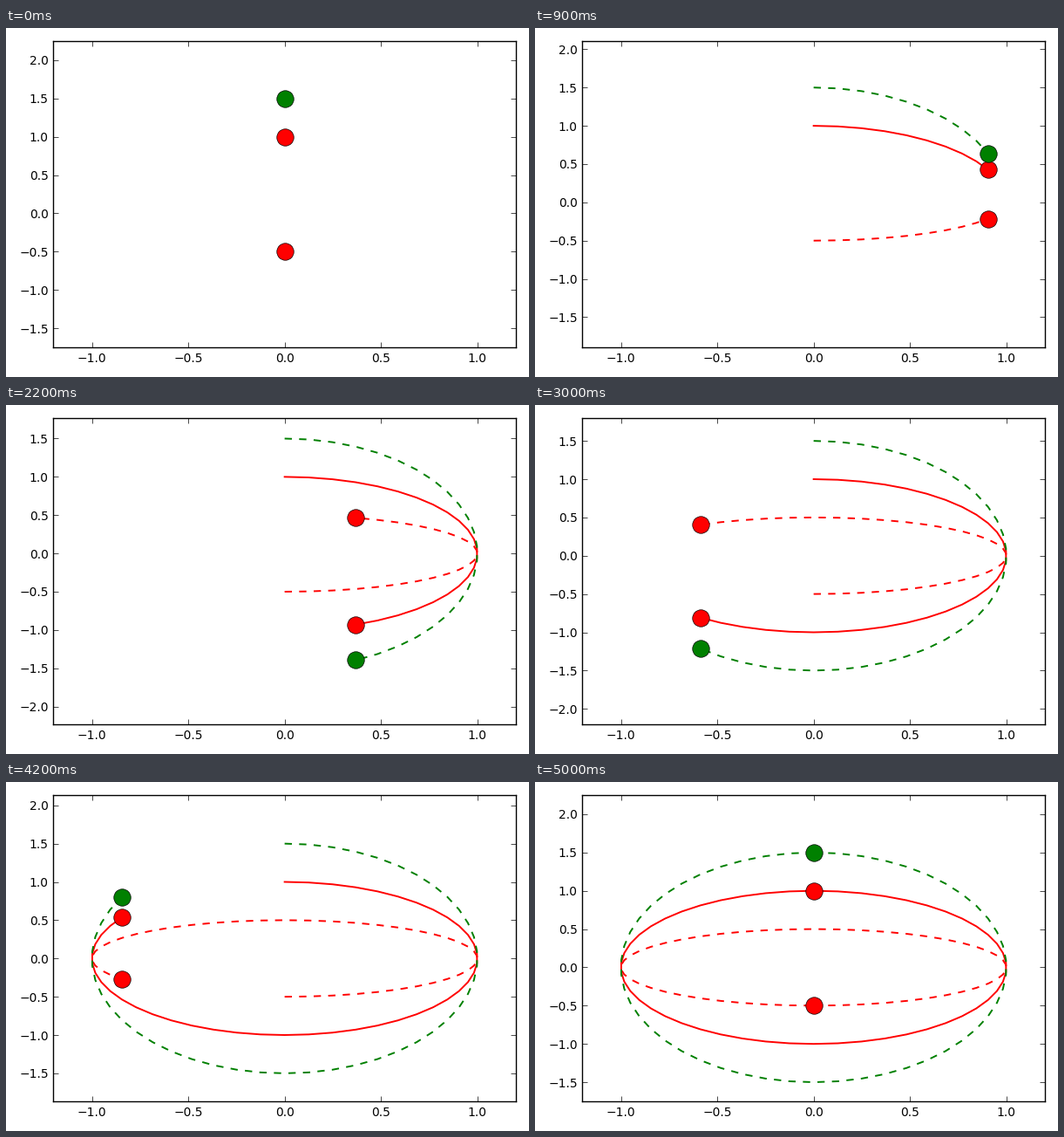
These frames come from a looping animation (600x400 px, 5.1 s). A matplotlib script:

```python
import matplotlib.pyplot as plt
import numpy as np
from matplotlib.animation import FuncAnimation
from matplotlib.ticker import MultipleLocator

W, H, DPI = 600, 400, 100
STEPS = 50

plt.rcParams.update({
    "font.family": "DejaVu Sans",
    "font.size": 10,
    "axes.linewidth": 1.0,
    "lines.scale_dashes": False,
    "path.simplify": False,
})

fig = plt.figure(figsize=(W / DPI, H / DPI), dpi=DPI, facecolor="white")
left, right, top, bottom = 54.3, 585, 15, 366
ax = fig.add_axes([left / W, 1 - bottom / H,
                   (right - left) / W, (bottom - top) / H])
ax.set_xlim(-1.2, 1.2)
ax.xaxis.set_major_locator(MultipleLocator(0.5))
ax.yaxis.set_major_locator(MultipleLocator(0.5))
ax.tick_params(direction="in", length=4, width=0.5, pad=4,
               top=True, right=True, labelsize=10)

# (vertical amplitude, colour, line style) of each body
DASHED = (0, (6, 6))
BODIES = [(1.0, "red", "-"), (-0.5, "red", DASHED), (1.5, "green", DASHED)]

trails, dots = [], []
for amp, color, style in BODIES:
    trails += ax.plot([], [], color=color, ls=style, lw=1.4,
                      dash_capstyle="butt", zorder=2)
    dots += ax.plot([], [], "o", color=color, ms=14,
                    mec="black", mew=0.5, zorder=3)

angle = 2 * np.pi * np.arange(STEPS + 1) / STEPS


def update(i):
    a = angle[:i + 1]
    x, y = np.sin(a), np.cos(a)
    for (amp, _, _), trail, dot in zip(BODIES, trails, dots):
        trail.set_data(x, amp * y)
        dot.set_data(x[-1:], amp * y[-1:])
    # the view follows the middle of the outer bodies
    mid = 0.25 * y[-1]
    ax.set_ylim(mid - 2, mid + 2)
    return trails + dots


anim = FuncAnimation(fig, update, frames=STEPS + 1, interval=100,
                     repeat=True, repeat_delay=0, blit=False)
plt.show()
```
